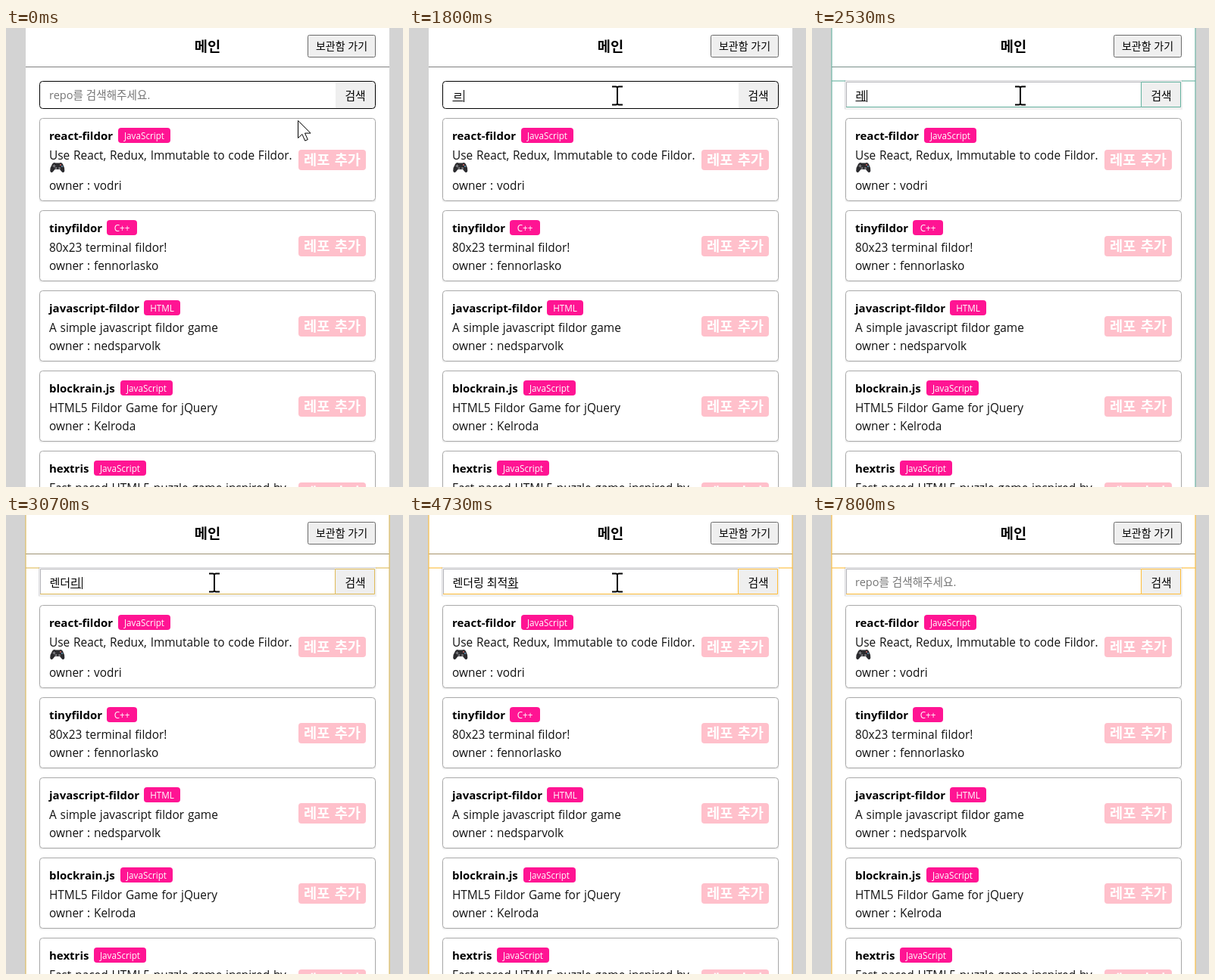
Write an HTML page that moves like this. It is 524x607 px and loops after 7930 ms.

```html
<!DOCTYPE html>
<html lang="ko">
<head>
<meta charset="utf-8">
<title>메인</title>
<style>
  html, body { margin: 0; width: 100%; height: 100%; overflow: hidden; background: #d3d3d3; }
  svg { display: block; font-family: "Open Sans", "Noto Sans CJK KR", "Noto Sans CJK", sans-serif; }
  text { white-space: pre; }
  .name { font-size: 15px; font-weight: 700; }
  .desc { font-size: 15.4px; word-spacing: .8px; fill: #111; }
  .tag { font-size: 11.7px; fill: #fff; text-anchor: middle; }
  .add { font-size: 18.7px; font-weight: 700; fill: #fff; text-anchor: middle; word-spacing: 1.5px; }
  .field { font-size: 15px; }
</style>
</head>
<body>
<svg id="stage" width="524" height="607" viewBox="0 0 524 607">
  <rect width="524" height="607" fill="#d3d3d3"/>
  <rect x="26" width="480" height="607" fill="#fff"/>
  <rect x="26" y="51" width="480" height="1" fill="#808080"/>
  <text x="266" y="31" text-anchor="middle" font-size="18.7" font-weight="700">메인</text>
  <rect x="398.5" y="9.5" width="89" height="29" rx="2" fill="#efefef" stroke="#6b6b6b"/>
  <text x="443" y="29" text-anchor="middle" font-size="14">보관함 가기</text>

  <g id="cards"></g>

  <rect x="44.5" y="70.5" width="443" height="36" rx="4" fill="#fff"/>
  <path d="M435 71h49a3 3 0 0 1 3 3v29a3 3 0 0 1-3 3h-49z" fill="#efefef"/>
  <rect x="44.5" y="70.5" width="443" height="36" rx="4" fill="none" stroke="#000"/>

  <g id="flash" fill="none">
    <path d="M44.5 70.5h443v36h-443z" stroke="#f0f0f0" stroke-width="3"/>
    <path d="M43.5 107V69.5H488" stroke="#d9d9dd"/>
    <path d="M45.5 105V71.5H434" stroke="#b4b4ba"/>
    <g id="tint">
      <path d="M26 0V607M506 0V607" stroke-width="2" opacity=".55"/>
      <path d="M26 70H44M488 70H506" stroke-width="2" opacity=".55"/>
      <path d="M26 51.5H506" opacity=".3"/>
      <path d="M45 104.5H434.5V71.5H486.5V104.5H434.5"/>
    </g>
  </g>

  <text x="461" y="94.5" text-anchor="middle" font-size="14.8">검색</text>
  <text id="hint" x="57" y="94" font-size="14.6" fill="#757575">repo를 검색해주세요.</text>
  <text id="typed" class="field" x="57.5" y="94.5"></text>
  <rect id="under" y="96" height="1"/>
  <rect id="caret" y="82" width="1" height="16"/>

  <path id="arrow" d="M385.5 122.5v23l5.4-5 3.8 8.6 3.6-1.6-3.8-8.4h7.5z" fill="#fff" stroke="#000"/>
  <path id="beam" d="M-7-12h5q2 0 2 2 0-2 2-2h5M0-10V10M-7 12h5q2 0 2-2 0 2 2 2h5"
        fill="none" stroke="#000" stroke-width="2"/>
</svg>
<script>
const LOOP = 7930;
const $ = id => document.getElementById(id);

// name, badge, badge x, badge width, description, owner, top, height
const repos = [
  ["react-fildor", "JavaScript", 148, 69, "Use React, Redux, Immutable to code Fildor.", "vodri", 119, 110],
  ["tinyfildor", "C++", 133, 40, "80x23 terminal fildor!", "fennorlasko", 241, 94],
  ["javascript-fildor", "HTML", 182, 48, "A simple javascript fildor game", "nedsparvolk", 347, 94],
  ["blockrain.js", "JavaScript", 151, 69, "HTML5 Fildor Game for jQuery", "Kelroda", 453, 94],
  ["hextris", "JavaScript", 116, 69, "Fast-paced HTML5 puzzle game inspired by", "", 559, 110]
];

const box = (x, y, w, h, extra) =>
  `<rect x="${x}" y="${y}" width="${w}" height="${h}" rx="4" ${extra}/>`;
const label = (cls, x, y, s) => `<text class="${cls}" x="${x}" y="${y}">${s}</text>`;

const gamepad = `<path d="M61 180q2-3 4.500-1.500h5q2.500-1.500 4.500 1.500 2.500 4.500 2.300 9-.8 3.500-3.600 1.200l-2.700-3.200h-6.500l-2.700 3.200q-2.800 2.300-3.600-1.200-.2-4.500 2.800-9z" fill="#2b2b2e"/>
  <path d="M61.500 182.500h4M63.500 180.500v4" stroke="#8a8a8e"/>
  <circle cx="72" cy="181" r="1" fill="#c66"/><circle cx="74" cy="183" r="1" fill="#69b"/>
  <circle cx="66" cy="185.500" r="1.400" fill="#77777b"/><circle cx="70.500" cy="185.500" r="1.400" fill="#77777b"/>`;

$("cards").innerHTML = repos.map(([name, tag, tx, tw, desc, owner, y, h]) => {
  const by = y + h / 2 - 13;
  return box(43.5, y + 1.5, 445, h, 'fill="#000" opacity=".06"') +
    box(44.5, y + .5, 443, h - 1, 'fill="#fff" stroke="#a9a9a9"') +
    label("name", 57, y + 28.5, name) +
    box(tx, y + 13, tw, 20, 'fill="#ff1493"') +
    label("tag", tx + tw / 2, y + 27.5, tag) +
    label("desc", 57, y + 55, desc) +
    (owner && label("desc", 57, y + h - 15, "owner : " + owner)) +
    box(386, by, 89, 27, 'fill="#ffc0cb"') +
    label("add", 430.5, by + 20, "레포 추가");
}).join("") + gamepad;

// time, field text, 1 while the last syllable is being composed
const typing = [
  [0, "", 0], [1470, "ㄹ", 1], [2000, "래", 1], [2400, "ㄹ", 1], [2530, "레", 1],
  [2600, "렌", 1], [2730, "렌ㄷ", 1], [2800, "렌더", 1], [2930, "렌덜", 1],
  [3070, "렌더리", 1], [3130, "렌더링", 1], [3270, "렌더링 ", 0],
  [3470, "렌더링 ㅊ", 1], [3530, "렌더링 초", 1], [3600, "렌더링 최", 1],
  [3670, "렌더링 최ㅈ", 1], [3730, "렌더링 최저", 1], [4000, "렌더링 최적", 1],
  [4130, "렌더링 최적ㅎ", 1], [4200, "렌더링 최적화", 1],
  [5470, "렌더링 최적", 0], [5600, "렌더링 최", 0], [5730, "렌더링 ", 0],
  [5870, "렌더링", 0], [6000, "렌더", 0], [6200, "렌", 0], [6330, "", 0]
];

// render highlight: time, step in the colour ramp (-1 is hidden)
const ramp = ["#37afa9", "#63b19e", "#80b393", "#97b488", "#abb67d",
              "#beb771", "#cfb965", "#dfba57", "#efbb49", "#febc38"];
const flashes = [[0, -1], [1530, 0], [1800, -1], [2000, 0], [2200, -1], [2400, 0],
  [2530, 1], [2600, 2], [2730, 4], [2800, 5], [2930, 6], [3070, 7], [3130, 8], [3270, 9]];

const blinks = [[0, 0], [470, 1], [930, 0], [1470, 1], [4730, 0], [5270, 1],
  [6000, 0], [6530, 1], [7130, 0], [7670, 0]];

// text pointer: time, x, y (no place is hidden)
const pointer = [[0], [70, 340, 98], [130, 294, 82], [270, 280, 86], [330, 275, 89.5],
  [6870, 279, 86], [6930]];

const at = (list, t) => list.findLast(row => row[0] <= t);
const show = (id, on) => $(id).setAttribute("visibility", on ? "visible" : "hidden");

function draw(t) {
  const [, text, composing] = at(typing, t);
  const field = $("typed");
  if (field.textContent !== text) field.textContent = text;
  show("hint", !text);

  const width = text ? field.getComputedTextLength() : 0;
  $("caret").setAttribute("x", Math.round(57.5 + width + (text ? 1 : 0)));
  show("caret", at(blinks, t)[1]);

  show("under", composing);
  if (composing) {
    const last = field.getSubStringLength(text.length - 1, 1);
    $("under").setAttribute("x", 57.5 + width - last);
    $("under").setAttribute("width", last);
  }

  const step = at(flashes, t)[1];
  $("flash").setAttribute("display", step < 0 ? "none" : "inline");
  if (step >= 0) $("tint").setAttribute("stroke", ramp[step]);

  show("arrow", t < 70);
  const [, x, y] = at(pointer, t);
  show("beam", x);
  if (x) $("beam").setAttribute("transform", `translate(${x} ${y})`);
}

const start = performance.now();
function tick() {
  draw((performance.now() - start) % LOOP);
  requestAnimationFrame(tick);
}
tick();
</script>
</body>
</html>
```
